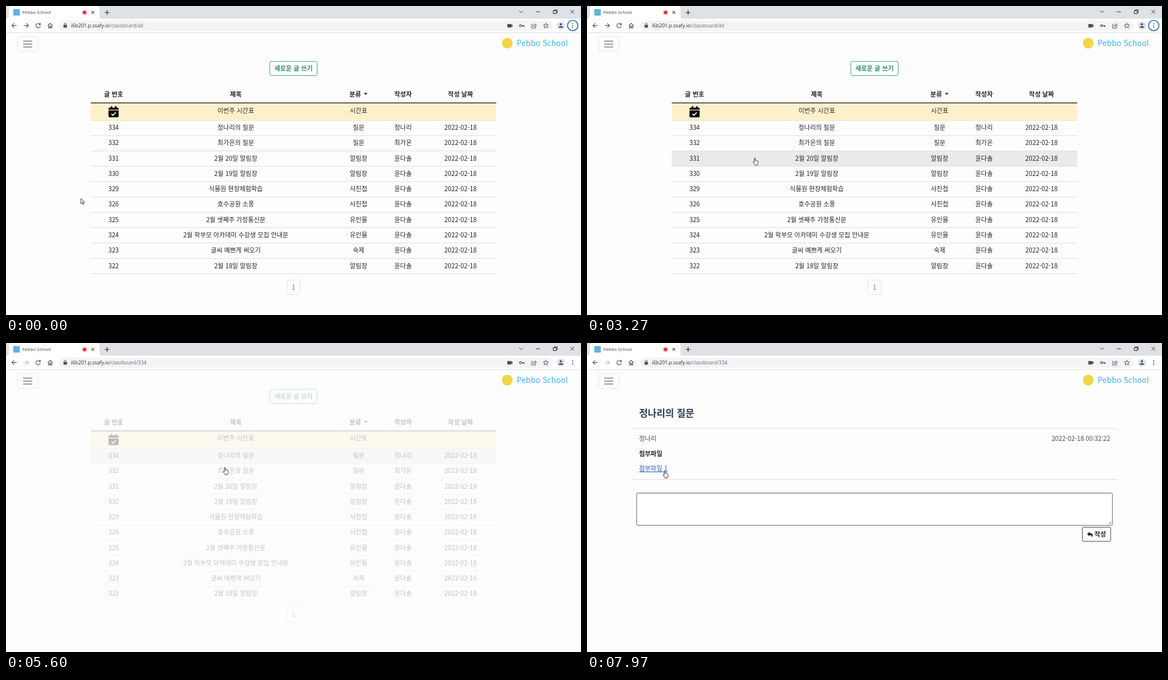
These frames come from a looping animation (1021 by 549 pixels, 8 s). An HTML page:

```html
<!DOCTYPE html>
<html lang="ko">
<head>
<meta charset="utf-8">
<title>Class board</title>
<style>
html, body { margin: 0; width: 100%; height: 100%; overflow: hidden; background: #fdfdfd; }
svg { display: block; width: 100vw; height: 100vh; }
.page text { font: 11.2px "Noto Sans CJK KR", "Noto Sans CJK", sans-serif; fill: #212529; }
.page .b { font-weight: 700; }
.chrome text { font-family: "Open Sans", "Noto Sans", sans-serif; }
.icon { fill: none; stroke: #4d5156; stroke-width: 1.2; }
</style>
</head>
<body>
<svg id="stage" viewBox="0 0 1021 549"></svg>
<script>
const stage = document.getElementById('stage');

function add(parent, tag, attrs = {}, content) {
  const el = document.createElementNS('http://www.w3.org/2000/svg', tag);
  for (const k in attrs) el.setAttribute(k, attrs[k]);
  if (content !== undefined) el.textContent = content;
  parent.appendChild(el);
  return el;
}
const rect = (p, x, y, width, height, attrs) => add(p, 'rect', { x, y, width, height, ...attrs });
const circle = (p, cx, cy, r, attrs) => add(p, 'circle', { cx, cy, r, ...attrs });
const path = (p, d, attrs) => add(p, 'path', { d, ...attrs });
const icon = (p, d, attrs) => path(p, d, { class: 'icon', ...attrs });
const text = (p, x, y, s, attrs) => add(p, 'text', { x, y, ...attrs }, s);
// Text centred on (x, y)
const label = (p, x, y, s, attrs) => text(p, x, y + 4.1, s, { 'text-anchor': 'middle', ...attrs });
const group = (p, cls = '') => add(p, 'g', { class: cls });

const SCHOOL = 'Pebbo School';

rect(stage, 0, 0, 1021, 549, { fill: '#fdfdfd' });

// ---- list page ----
const ROW_TOP = 203, ROW_H = 27.27, COLS = [191, 408, 626, 705, 807];
const PUPILS = ['정나리', '최가온'], TEACHER = '윤다솔';
const posts = [
  [334, PUPILS[0] + '의 질문', '질문', PUPILS[0]],
  [332, PUPILS[1] + '의 질문', '질문', PUPILS[1]],
  [331, '2월 20일 알림장', '알림장'],
  [330, '2월 19일 알림장', '알림장'],
  [329, '식물원 현장체험학습', '사진첩'],
  [326, '호수공원 소풍', '사진첩'],
  [325, '2월 셋째주 가정통신문', '유인물'],
  [324, '2월 학부모 아카데미 수강생 모집 안내문', '유인물'],
  [323, '글씨 예쁘게 써오기', '숙제'],
  [322, '2월 18일 알림장', '알림장']
];

const list = group(stage, 'page');
rect(list, 468.5, 98.3, 84, 25.2, { rx: 3, fill: '#fff', stroke: '#459f75' });
label(list, 510.5, 110.6, '새로운 글 쓰기', { class: 'b', style: 'fill:#2f8f61' });
['글 번호', '제목', '분류', '작성자', '작성 날짜'].forEach((s, i) =>
  label(list, COLS[i] - (i === 2 ? 6 : 0), 157.3, s, { class: 'b' }));
path(list, 'M635.5 154.5h6.4l-3.2 3.4z', { fill: '#212529' });

rect(list, 150.5, 172, 720, 31, { fill: '#fef0cb' });
path(list, 'M150.5 203.3h720', { stroke: '#e8dfc4' });
const hover = rect(list, 150.5, 0, 720, ROW_H, { fill: '#000', opacity: .075 });
path(list, 'M150.5 172.2h720', { stroke: '#2b2b2b', 'stroke-width': 1.4 });
path(list, 'M186 178h2.6v2.4h5V178h2.6v2.4h2q1.8 0 1.8 1.8v2H182v-2q0-1.8 1.8-1.8h2.2zM182 185.5h18v10.3q0 1.9-1.8 1.9h-14.4q-1.8 0-1.8-1.9z', { fill: '#0b0b0b' });
path(list, 'M187.2 191.6l2.7 2.6 5-5.2', { fill: 'none', stroke: '#fff', 'stroke-width': 1.7 });
label(list, COLS[1], 185.5, '이번주 시간표');
label(list, COLS[2], 185.5, '시간표');
posts.forEach(([no, title, kind, author = TEACHER], i) => {
  const y = 216 + i * ROW_H;
  [no, title, kind, author, '2022-02-18'].forEach((s, c) => label(list, COLS[c], y, s));
  path(list, `M150.5 ${ROW_TOP + (i + 1) * ROW_H}h720`, { stroke: '#d9dde4' });
});
rect(list, 499.2, 487, 22.8, 25.2, { rx: 3, fill: '#fff', stroke: '#dee2e6' });
label(list, 510.5, 499.5, '1', { style: 'fill:#3a7de8' });

// ---- post page ----
const post = group(stage, 'page');
text(post, 92.5, 130.6, PUPILS[0] + '의 질문', { class: 'b', style: 'font-size:16.9px;fill:#2c3e50' });
path(post, 'M82 151.5h857M80 242.3h862', { stroke: '#d9dbdf' });
text(post, 92.5, 174.2, PUPILS[0], { style: 'fill:#4a4f55' });
text(post, 929, 174, '2022-02-18 00:32:22', { 'text-anchor': 'end', style: 'fill:#4a4f55' });
text(post, 92.5, 200.8, '첨부파일', { class: 'b' });
const link = text(post, 92.5, 227.4, '첨부파일 1', { 'text-decoration': 'underline' });
rect(post, 88, 266.7, 845, 57.3, { rx: 2.5, fill: '#fff', stroke: '#55585c' });
path(post, 'M926 322l5-5M929 322l2-2', { stroke: '#555', 'stroke-width': .8 });
rect(post, 879.6, 327.3, 50.3, 25, { rx: 2, fill: '#fff', stroke: '#3c4044' });
path(post, 'M888 339.4l4.5-4v2.4c3.6 0 5.6 1.5 5.6 4.2 0 1.4-.7 2.5-1.7 3.2.6-2.8-.8-3.9-3.9-3.9v2.3z', { fill: '#212529' });
label(post, 911.2, 339.7, '작성', { class: 'b' });

// ---- site header ----
const header = group(stage, 'page');
rect(header, 20.5, 54.5, 36.5, 26.3, { rx: 3, fill: '#fdfdfd', stroke: '#e6e6e8' });
path(header, 'M30.5 62.3h16M30.5 67.6h16M30.5 72.9h16', { stroke: '#666', 'stroke-width': 1.3 });
circle(header, 890, 66, 9.5, { fill: '#f0d548' });
text(header, 906.8, 71.2, SCHOOL, { style: 'font-size:14px;font-weight:500;fill:#3db5ea' });

// ---- browser chrome ----
const chrome = group(stage, 'chrome');
rect(chrome, 0, 0, 1021, 23, { fill: '#dee1e6' });
path(chrome, 'M0 23q5 0 5-5V5q0-5 5-5H161q5 0 5 5v13q0 5 5 5z', { fill: '#fff' });
rect(chrome, 0, 22.6, 1021, 24.6, { fill: '#fff' });
path(chrome, 'M0 47.4h1021', { stroke: '#dcdde0' });
rect(chrome, 94, 26, 877, 18, { rx: 9, fill: '#f3f4f3' });
rect(chrome, 13, 5.5, 11.5, 11.5, { fill: '#5bb5dc' });
text(chrome, 29, 14.2, SCHOOL, { 'font-size': 8, fill: '#3c4043' });
circle(chrome, 139.5, 11.5, 4, { fill: '#fff', stroke: '#e2686a', 'stroke-width': .9 });
circle(chrome, 139.5, 11.5, 2.8, { fill: '#d8232a' });
icon(chrome, 'M151.6 8.8l5 5m0-5l-5 5');
icon(chrome, 'M175.3 11.5h8.4m-4.2-4.2v8.4', { style: 'stroke:#222' });
icon(chrome, 'M911 8.4l3.4 3.4 3.4-3.4M941 10.3h7.4M1002.3 6.8l6.6 6.6m0-6.6l-6.6 6.6', { style: 'stroke:#333;stroke-width:1' });
icon(chrome, 'M971.8 8.3h5.2v5.2h-5.2zM973.5 8V6.8h5.2V12h-1.4', { style: 'stroke:#222;stroke-width:1' });

icon(chrome, 'M18.8 34.7H10.6m3.9-4l-4 4 4 4');
const forward = icon(chrome, 'M31.6 34.7h8.2m-3.9-4l4 4-4 4');
icon(chrome, 'M60.4 32.4a4 4 0 1 0 .6 3.5M61 30.2v3h-3');
icon(chrome, 'M74.4 34.7l4.1-3.8 4.1 3.8M75.6 34v4.8h2v-2.6h1.8v2.6h2V34');
rect(chrome, 102.2, 33.6, 6, 5, { rx: .6, fill: '#4d5156' });
icon(chrome, 'M103.4 33.8v-1.3a1.8 1.8 0 0 1 3.6 0v1.3', { style: 'stroke-width:1' });
const url = text(chrome, 115.5, 38, 'i6b201.p.ssafy.io', { 'font-size': 8.8, fill: '#2a2c2f' });
const route = add(url, 'tspan', { fill: '#66696e' });

path(chrome, 'M891 32h5.4q.8 0 .8.8v1l2-1.5v5.4l-2-1.5v1.2q0 .8-.8.8H891q-.8 0-.8-.8v-4.6q0-.8.8-.8z', { fill: '#4d5156' });
circle(chrome, 913.6, 35, 1.9, { class: 'icon' });
icon(chrome, 'M915.5 35h5.2m-1.4 0v2.2', { style: 'stroke-width:1.6' });
icon(chrome, 'M935 32.3h-1.8v7h7.4v-2M935.4 37c.2-2.6 1.8-3.6 4-3.6v-2l2.6 2.9-2.6 2.8v-1.9c-1.8 0-3 .4-4 1.8z', { style: 'stroke-width:.9' });
let star = '';
for (let i = 0; i < 10; i++) {
  const a = i * Math.PI / 5, r = i % 2 ? 2.1 : 4.8;
  star += (i ? 'L' : 'M') + (958.6 + r * Math.sin(a)) + ' ' + (35.2 - r * Math.cos(a));
}
icon(chrome, star + 'z', { style: 'stroke-width:1' });
circle(chrome, 985.3, 34.7, 7.2, { fill: '#dde1ea' });
circle(chrome, 985.3, 32.6, 2, { fill: '#44536b' });
path(chrome, 'M981.3 38.8q0-3 4-3t4 3z', { fill: '#44536b' });
const ring = circle(chrome, 1006.3, 34.7, 9.2, { fill: '#fff', stroke: '#2a67b5', 'stroke-width': 1.7 });
[31.3, 34.7, 38.1].forEach(y => circle(chrome, 1006.3, y, 1, { fill: '#4d5156' }));

// ---- pointer ----
const pointer = group(stage);
const arrow = path(pointer, 'M0 0v9.3l2.1-2 1.5 3.4 1.5-.7-1.5-3.2h2.9z', { fill: '#fff', stroke: '#222', 'stroke-width': .9 });
const hand = path(pointer, 'M2.2 7.4V1.3q0-1 .9-1t.9 1v3.5q.9-.6 1.7.2.9-.5 1.6.3 1.4-.3 1.5 1.1v2.8q0 1.6-1 2.8v.9H3.4v-1Q1.6 10 .3 8.2q-.4-1 .5-1.3.6 0 1.4.8z', { fill: '#fff', stroke: '#222', 'stroke-width': .9 });

// ---- motion ----
const LOOP = 8000, CLICK = 5340, LEAVE = 5470, FADE = 300, ENTER = LEAVE + FADE, SETTLE = 6100;
const SHIFT = 22, LOADING_GAP = 51;
const span = (t, from, to) => Math.min(1, Math.max(0, (t - from) / (to - from)));
const show = (el, on) => el.setAttribute('display', on ? 'inline' : 'none');
const move = (el, x, y) => el.setAttribute('transform', `translate(${x} ${y})`);

// CSS "ease": cubic-bezier(.25, .1, .25, 1)
function ease(x) {
  if (x <= 0 || x >= 1) return x;
  const curve = (u, a, b) => 3 * u * (1 - u) ** 2 * a + 3 * u * u * (1 - u) * b + u ** 3;
  let lo = 0, hi = 1;
  for (let i = 0; i < 24; i++) {
    const mid = (lo + hi) / 2;
    if (curve(mid, .25, .25) < x) lo = mid; else hi = mid;
  }
  return curve(lo, .1, 1);
}

function pointerAt(t) {
  const p = 1 - (1 - span(t, 2830, 3930)) ** 2;
  const q = (1 - Math.cos(Math.PI * span(t, 6970, 7950))) / 2;
  return [133 + 252.5 * p - 250.5 * q, 342 - 121 * p ** 1.16 + 6 * q];
}

function render(t) {
  const [x, y] = pointerAt(t);
  const onList = t < ENTER;

  const out = ease(span(t, LEAVE, ENTER));
  show(list, onList);
  list.setAttribute('opacity', 1 - out);
  move(list, 0, -SHIFT * out);

  const enter = ease(span(t, ENTER, ENTER + FADE));
  show(post, !onList);
  post.setAttribute('opacity', enter);
  move(post, 0, SHIFT * (1 - enter) + (t < SETTLE ? LOADING_GAP : 0));

  const row = Math.floor((y - ROW_TOP) / ROW_H);
  const onRow = onList && x >= 150.5;
  show(hover, onRow);
  hover.setAttribute('y', ROW_TOP + row * ROW_H);
  const onLink = !onList && x < 142;
  link.style.fill = onLink ? '#2a62b8' : '#2f7be0';

  move(pointer, x, y);
  show(hand, onRow || onLink);
  show(arrow, !(onRow || onLink));

  show(ring, t < CLICK);
  forward.style.stroke = t < LEAVE ? '#4d5156' : '#bcbfc3';
  route.textContent = '/classboard/' + (t < LEAVE ? 'all' : '334');
}

const start = performance.now();
function tick() {
  render((performance.now() - start) % LOOP);
  requestAnimationFrame(tick);
}
render(0);
requestAnimationFrame(tick);
</script>
</body>
</html>
```
